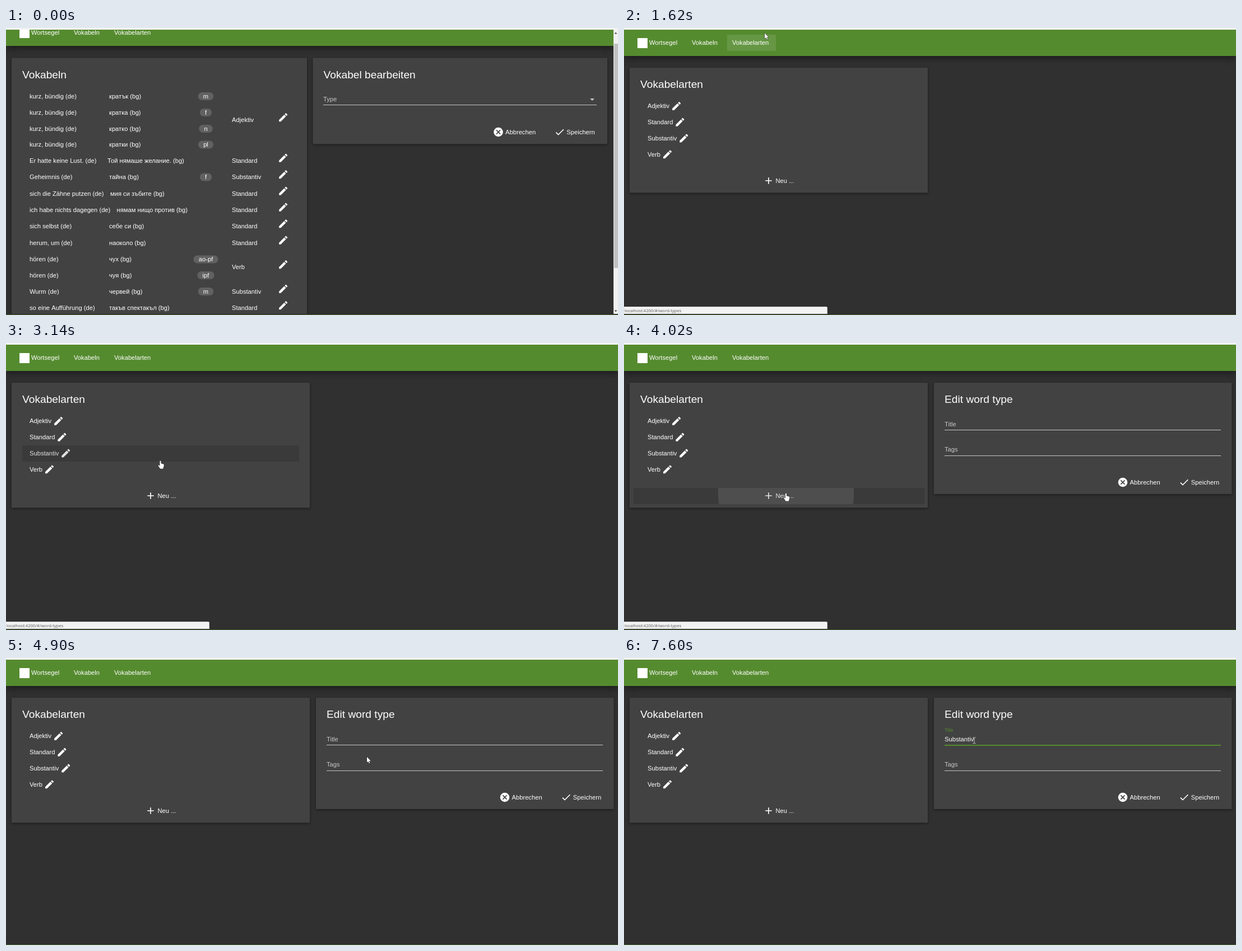
Recreate the animation shown at these times as an HTML page with a canvas. Size 1092 by 513 pixels, loop 8 s.

```html
<!DOCTYPE html>
<html lang="de">
<head>
<meta charset="utf-8">
<title>Vokabeltrainer</title>
<style>
html, body { margin: 0; width: 100%; height: 100%; overflow: hidden; background: #303030; }
canvas { display: block; width: 100vw; height: 100vh; }
</style>
</head>
<body>
<canvas id="stage" width="1092" height="513"></canvas>
<script>
const g = document.getElementById('stage').getContext('2d');
const GREEN = '#558b2f', SOFT = '#c6c6c6', DIM = 'rgba(0,0,0,.12)';
const LOOP = 8000, TICK = 108.75;

const icons = {
  edit: new Path2D('M3 17.25V21h3.75L17.81 9.94l-3.75-3.75zM20.71 7.04a1 1 0 0 0 0-1.41l-2.34-2.34a1 1 0 0 0-1.41 0l-1.83 1.83 3.75 3.75z'),
  cancel: new Path2D('M12 2a10 10 0 1 0 0 20a10 10 0 1 0 0-20zM17 15.59L15.59 17 12 13.41 8.41 17 7 15.59 10.59 12 7 8.41 8.41 7 12 10.59 15.59 7 17 8.41 13.41 12z'),
  done: new Path2D('M9 16.17L4.83 12l-1.42 1.41L9 19 21 7l-1.41-1.41z'),
  add: new Path2D('M19 13h-6v6h-2v-6H5v-2h6V5h2v6h6z')
};
const cursors = {
  arrow: new Path2D('M0 0v10.2l2.3-2.2 1.6 3.6 1.5-.7-1.6-3.4h3.3z'),
  hand: new Path2D('M-1.1 1.2a1.1 1.1 0 0 1 2.2 0v3.6l4 .9q1.4.5 1.3 2.2l-.7 3.6-1 2.7h-5l-3.6-5.2q-.3-1.5 1-1.2l1.8 1.5z'),
  beam: new Path2D('M-2.5-5h1.7l.8.6.8-.6h1.7M0-4.4v9M-2.5 5.5h1.7l.8-.6.8.6h1.7')
};

// time, tip x, tip y, shape held until the next point
const path = [
  [0, 591, 230, ''], [200, 591, 230, 'arrow'], [300, 352, 205, ''],
  [515, 352, 205, 'arrow'], [1291, 250, 5, 'hand'], [1400, 251, 9, 'arrow'],
  [2052, 251, 9, 'arrow'], [2378, 363, 266, 'hand'], [2814, 363, 266, 'hand'],
  [3140, 275.5, 210.5, 'hand'], [3357, 262, 82, 'arrow'], [3466, 266, 130, 'hand'],
  [3683, 289, 268.5, 'hand'], [4445, 289, 268.5, 'arrow'], [4662, 590, 225, 'arrow'],
  [4771, 650, 190, 'arrow'], [5098, 632, 150, 'beam'], [5206, 625, 147, 'beam'], [LOOP, 625, 147, 'beam']
];

// German, Bulgarian, tag, x of the Bulgarian column, y
const words = [
  ['kurz, bündig', 'кратък', 'm', 184, 122],
  ['kurz, bündig', 'кратка', 'f', 184, 151],
  ['kurz, bündig', 'кратко', 'n', 184, 180],
  ['kurz, bündig', 'кратки', 'pl', 184, 208.5],
  ['Er hatte keine Lust.', 'Той нямаше желание.', '', 181, 237],
  ['Geheimnis', 'тайна', 'f', 184, 266.5],
  ['sich die Zähne putzen', 'мия си зъбите', '', 186, 296],
  ['ich habe nichts dagegen', 'нямам нищо против', '', 197.5, 325],
  ['sich selbst', 'себе си', '', 184, 354.5],
  ['herum, um', 'наоколо', '', 184, 384],
  ['hören', 'чух', 'ao-pf', 184, 413.5],
  ['hören', 'чуя', 'ipf', 184, 442],
  ['Wurm', 'червей', 'm', 184, 471],
  ['so eine Aufführung', 'такъв спектакъл', '', 184, 500.5]
];
const kinds = [
  ['Adjektiv', 164.5], ['Standard', 237], ['Substantiv', 266.5], ['Standard', 296],
  ['Standard', 325], ['Standard', 354.5], ['Standard', 384], ['Verb', 427.5],
  ['Substantiv', 471], ['Standard', 500.5]
];
const keyTimes = [5760, 6070, 6190, 6400, 6400, 6630, 6740, 6850, 6950, 7490];

const clamp = v => Math.max(0, Math.min(1, v));
const mix = (a, b, p) => a + (b - a) * p;

function rect(x, y, w, h, color) {
  g.fillStyle = color;
  g.fillRect(x, y, w, h);
}

function round(x, y, w, h, r, color) {
  g.fillStyle = color;
  g.beginPath();
  g.roundRect(x, y, w, h, r);
  g.fill();
}

// y is the middle of the line
function text(str, x, y, color = '#fff', size = 11.2, font = '"Liberation Sans", Arial, sans-serif') {
  g.font = `${size}px ${font}`;
  g.fillStyle = color;
  g.fillText(str, x, Math.round(y + size * .3465));
  return g.measureText(str).width;
}

function icon(name, x, y) {
  g.save();
  g.translate(x, y);
  g.scale(.83, .83);
  g.translate(-12, -12);
  g.fillStyle = '#fff';
  g.fill(icons[name], 'evenodd');
  g.restore();
}

function shadow(blur, dy, alpha, draw) {
  g.save();
  g.shadowColor = `rgba(0,0,0,${alpha})`;
  g.shadowBlur = blur;
  g.shadowOffsetY = dy;
  draw();
  g.restore();
}

function card(x, y, w, h, title) {
  shadow(4, 1.5, .45, () => round(x, y, w, h, 1.6, '#424242'));
  text(title, x + 19, y + 29.5, '#fff', 19.2);
}

function header(bottom, width) {
  const y = bottom - 23.5;
  shadow(12, 4, .45, () => rect(0, -10, width, bottom + 10, GREEN));
  rect(24, Math.round(y - 9), 18, 18, '#fff');
  text('Wortsegel', 45, y);
  text('Vokabeln', 121, y);
  text('Vokabelarten', 193, y);
}

function buttons(x, y) {
  icon('cancel', x, y);
  text('Abbrechen', x + 12.5, y);
  icon('done', x + 109.5, y);
  text('Speichern', x + 121.8, y);
}

// growing circle clipped to a button
function ripple(box, x, y, r, alpha) {
  g.save();
  g.beginPath();
  g.rect(...box);
  g.clip();
  g.fillStyle = `rgba(255,255,255,${alpha})`;
  g.beginPath();
  g.arc(x, y, r, 0, 7);
  g.fill();
  g.restore();
}

function hover(tip, x, y, w, h) {
  if (tip.shape && tip.x >= x && tip.x < x + w && tip.y >= y && tip.y < y + h) rect(x, y, w, h, DIM);
}

function triangle(x, y, w, h, color) {
  g.fillStyle = color;
  g.beginPath();
  g.moveTo(x - w, y - h);
  g.lineTo(x + w, y - h);
  g.lineTo(x, y + h);
  g.fill();
}

function vocabulary(t, tip) {
  card(10, 53.5, 527, 480, 'Vokabeln');
  for (const [de, bg, tag, x, y] of words) {
    text(de + ' (de)', 42, y);
    text(bg + ' (bg)', x, y);
    if (!tag) continue;
    const w = g.measureText(tag).width;
    round(356.5 - w / 2 - 9.2, y - 7, w + 18.4, 14, 7, '#616161');
    text(tag, 356.5 - w / 2, y);
  }
  for (const [kind, y] of kinds) {
    text(kind, 403, y);
    icon('edit', 494.7, y - 4.7);
  }
  card(547.5, 53.5, 525.5, 154, 'Vokabel bearbeiten');
  text('Type', 566, 127.5, SOFT);
  triangle(1046, 128, 4, 2, SOFT);
  rect(566, 137, 488, 1, SOFT);
  buttons(878.5, 186);

  header(32, 1084);
  const box = [180, -6, 91, 29];
  hover(tip, ...box);
  if (t >= 1500) ripple(box, 251, 9, 23, .1);

  rect(1084, 3, 8, 509, '#f1f1f1');
  rect(1085, 28, 7, 401, '#c1c1c1');
  triangle(1088, 9, 2.5, -1.5, '#505050');
  triangle(1088, 506, 2.5, 1.5, '#505050');
}

function wordTypes(t, s, tip) {
  card(10, 71, 532, 223.5, 'Vokabelarten');
  ['Adjektiv', 'Standard', 'Substantiv', 'Verb'].forEach((kind, i) => {
    const y = 139.5 + i * 28.8;
    icon('edit', 42 + text(kind, 42, y) + 12.5, y);
    hover(tip, 29, Math.round(y - 14.4), 494, 29);
  });
  icon('add', 258, 273);
  text('Neu ...', 270.5, 273);
  const box = [17, 259, 519, 29];
  hover(tip, ...box);
  if (t >= 3900) ripple(box, 289, 269, (s - 3890) * 1.01, .1 * clamp((4553 - s) / 216));
  if (t >= 4020) editor(t, s);

  header(50, 1092);
  if (t < 1830) rect(184, 12, 87, 29, 'rgba(255,255,255,.1)');
}

function editor(t, s) {
  card(553, 71, 531.5, 199, 'Edit word type');
  const p = clamp((s - 5400) / 300), focus = t >= 5430;
  text('Title', 572, mix(144.7, 128.7, p), focus ? GREEN : SOFT, mix(11.2, 8.4, p));
  rect(572, 155, 493, 1, SOFT);
  if (focus) {
    const w = 493 * mix(.5, 1, p);
    rect(818.5 - w / 2, 155, w, 2, GREEN);
  }
  const typed = 'Substantiv'.slice(0, keyTimes.filter(k => k <= t).length);
  const end = 572 + text(typed, 572, 144.7);
  if (t >= 5640 && t < 7600) rect(Math.round(end), 139, 1, 12, GREEN);
  text('Tags', 572, 190.2, SOFT);
  rect(572, 201, 493, 1, SOFT);
  buttons(890, 249);
}

function statusBar() {
  round(-2, 498, 365, 14, [0, 2, 0, 0], '#b8b8b8');
  round(-2, 498.6, 364.4, 13.4, [0, 2, 0, 0], '#f2f2f2');
  text('localhost:4200/#/word-types', 1, 505, '#5a5a5a', 7.6, '"Open Sans", "Noto Sans", sans-serif');
}

function pointer(s) {
  const i = path.findLastIndex(p => p[0] <= s);
  const a = path[i], b = path[i + 1] || a;
  const p = b === a ? 0 : (s - a[0]) / (b[0] - a[0]);
  return { x: mix(a[1], b[1], p), y: mix(a[2], b[2], p), shape: a[3] };
}

function drawPointer({ x, y, shape }) {
  if (!shape) return;
  g.save();
  g.translate(x, y);
  g.lineWidth = 1;
  g.strokeStyle = shape === 'beam' ? '#c4c4c4' : '#111';
  g.stroke(cursors[shape]);
  g.fillStyle = '#fff';
  if (shape !== 'beam') g.fill(cursors[shape]);
  g.restore();
}

function draw(t) {
  const k = Math.floor((t - 515) / TICK);
  const s = k < 0 ? t : Math.min(530 + k * TICK, LOOP - 1);
  const tip = pointer(s);
  rect(0, 0, 1092, 513, '#303030');
  if (t < 1620) vocabulary(t, tip);
  else wordTypes(t, s, tip);
  if (t >= 1180 && t < 4570) statusBar();
  rect(0, 0, 1092, 3, '#f3f3f3');
  rect(0, 511, 1092, 1, '#282828');
  rect(0, 512, 1092, 1, '#41612a');
  drawPointer(tip);
}

let start;
function frame(now) {
  start ??= now;
  draw((now - start) % LOOP);
  requestAnimationFrame(frame);
}
requestAnimationFrame(frame);
</script>
</body>
</html>
```
